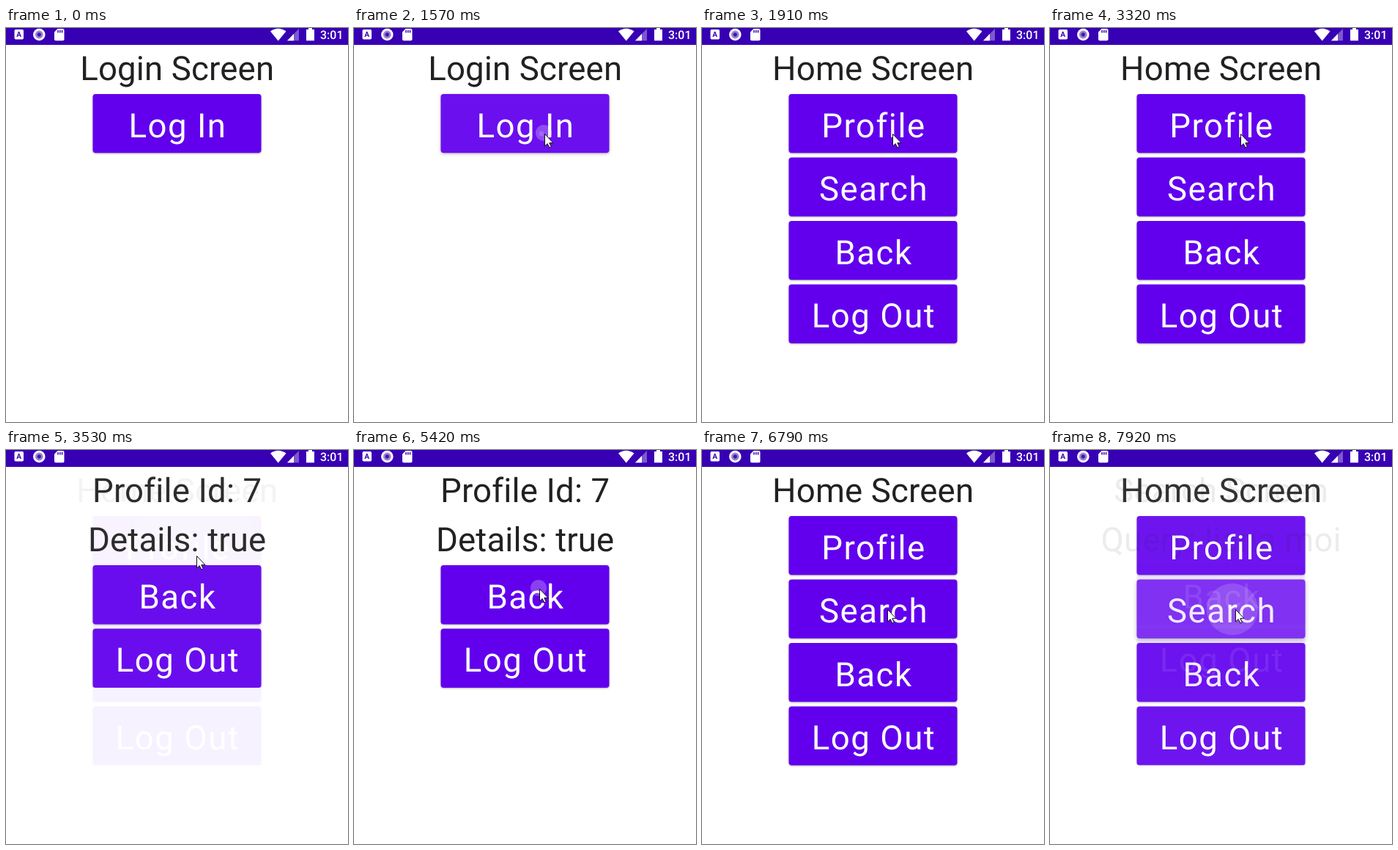
An HTML page that plays this animation: 467 by 537 pixels, repeating every 7.99 s.

```html
<!DOCTYPE html>
<html lang="en">
<head>
<meta charset="utf-8">
<title>Navigation demo</title>
<style>
html, body { margin: 0; width: 100%; height: 100%; overflow: hidden; background: #fff; }
svg { display: block; width: 100vw; height: 100vh; }
text { font-family: Roboto, sans-serif; text-rendering: geometricPrecision; }
.title, .label { font-size: 45.6px; text-anchor: middle; }
.title { fill: #212121; letter-spacing: .15px; }
.label { fill: #fff; letter-spacing: 1.5px; }
</style>
</head>
<body>
<svg id="stage" viewBox="0 0 467 537">
  <defs><clipPath id="clip"><rect id="clipRect" x="118.5" width="230" height="80.4" rx="4"/></clipPath></defs>
  <g id="screens"></g>
  <rect width="467" height="23" fill="#3700b3"/>
  <g fill="#fff">
    <rect x="11.5" y="2" width="12.5" height="13.5" rx="1.8"/>
    <text x="17.7" y="12" font-size="10" font-weight="700" text-anchor="middle" style="fill:#3700b3">A</text>
    <circle cx="45.3" cy="9" r="8.3"/>
    <circle cx="45.3" cy="9" r="4.2" fill="#7c5bc9" stroke="#9b82d8" stroke-width="2.4"/>
    <circle cx="45.3" cy="9" r="2.4" fill="#3d1a9c"/>
    <path d="M70.5 1H77.5q2 0 2 2V15.5q0 1.7-2 1.7H68q-2 0-2-1.7V5.5Z"/>
    <path d="M71 3v3.5M73.8 3v3.5M76.6 3v3.5" stroke="#3700b3" stroke-width="1.5"/>
    <path d="M361 4.5Q371.5-3 382.5 4.5L371.7 17.5Z"/>
    <path d="M400 1V17.2H384Z" opacity=".35"/>
    <path d="M393 8V17.2H384Z"/>
    <path d="M413 0h5v2h3v15.2h-11V2h3Z"/>
    <text x="429" y="15" font-size="16" font-weight="500">3:01</text>
  </g>
  <circle id="dot" r="11" fill="#fff" fill-opacity=".25"/>
  <path id="cursor" d="M.5.5V17L4.2 13.6 6.8 19 9.3 17.9 6.8 12.6H12Z" fill="#fff" stroke="#111"/>
</svg>
<script>
const LOOP = 7990, FADE = 300, STEP = 68;
const $ = id => document.getElementById(id);

function set(el, attrs) {
  for (const key in attrs) el.setAttribute(key, attrs[key]);
}

function add(parent, tag, attrs, text) {
  const el = document.createElementNS('http://www.w3.org/2000/svg', tag);
  set(el, attrs);
  if (text) el.textContent = text;
  return parent.appendChild(el);
}

// Headings are stacked first, then the buttons.
function makeScreen(headings, labels) {
  const root = add($('screens'), 'g');
  headings.forEach((s, i) => add(root, 'text', { class: 'title', x: 233.7, y: 71 + i * 67.2 }, s));
  const buttons = labels.map((s, i) => {
    const y = 22.7 + headings.length * 67.2 + i * 86.5;
    const rect = add(root, 'rect', { x: 118.5, y, width: 230, height: 80.4, rx: 4, fill: '#6200ee' });
    add(root, 'text', { class: 'label', x: 234.5, y: y + 58.6 }, s);
    return { y, rect };
  });
  return { root, buttons };
}

const login = makeScreen(['Login Screen'], ['Log In']);
const home = makeScreen(['Home Screen'], ['Profile', 'Search', 'Back', 'Log Out']);
const profile = makeScreen(['Profile Id: 7', 'Details: true'], ['Back', 'Log Out']);
const search = makeScreen(['Search Screen', 'Query: liana moi'], ['Back', 'Log Out']);

// down: finger touches; react: button responds; fade: crossfade begins; tick: phase of the stepped clock
const taps = [
  { from: login, to: home, button: 0, down: 1370, react: 1510, fade: 1600, tick: 1570 },
  { from: home, to: profile, button: 0, down: 3050, react: 3250, fade: 3312, tick: 3530 },
  { from: profile, to: home, button: 0, down: 5420, react: 5560, fade: 5635, tick: 5750 },
  { from: home, to: search, button: 1, down: 7650, react: 7780, fade: 7871, tick: 7920 }
];

const smooth = u => u * u * (3 - 2 * u);
const moves = [
  { start: 130, end: 1110, steps: 15, from: [415, 499], to: [260, 144], ease: u => 1 - (1 - u) ** 2.76 },
  { start: 4000, end: 4560, steps: 9, from: [260, 144], to: [253, 189], ease: smooth },
  { start: 6360, end: 6790, steps: 7, from: [253, 189], to: [253, 217], ease: smooth }
];

const clamp = (v, lo = 0, hi = 1) => Math.min(hi, Math.max(lo, v));

// cubic-bezier(.4, 0, .2, 1)
function fastOutSlowIn(x) {
  let lo = 0, hi = 1;
  for (let i = 0; i < 20; i++) {
    const s = (lo + hi) / 2, r = 1 - s;
    if (1.2 * s * r * r + .6 * s * s * r + s ** 3 < x) lo = s; else hi = s;
  }
  return x >= 1 ? 1 : smooth(lo);
}

function cursorAt(t) {
  const m = moves.filter(m => t >= m.start).pop();
  if (!m) return null;
  const k = Math.floor((t - m.start) / (m.end - m.start) * (m.steps - 1) + 1e-6);
  const u = m === moves[0] ? k / (m.steps - 1) : (k + 1) / m.steps;
  const p = m.ease(clamp(u));
  return m.from.map((a, i) => Math.round(a + (m.to[i] - a) * p));
}

const overlay = add($('stage'), 'g', { 'clip-path': 'url(#clip)', fill: '#fff' });
const tint = add(overlay, 'rect', { x: 118.5, width: 230, height: 80.4 });
const ripple = add(overlay, 'circle', { 'fill-opacity': .17 });

function draw(t) {
  const pos = cursorAt(t);
  const tap = taps.filter(p => t >= p.down).pop();
  const q = tap ? tap.tick + Math.floor((t - tap.tick) / STEP) * STEP : 0;
  const mix = tap ? fastOutSlowIn(clamp((q - tap.fade) / FADE)) : 0;
  const active = tap && mix < 1;
  const age = active ? Math.max(0, q - tap.react) : 0;

  for (const screen of [login, home, profile, search]) {
    const shown = !tap ? +(screen === login) : screen === tap.to ? mix : screen === tap.from ? 1 - mix : 0;
    screen.root.style.opacity = shown;
    screen.root.style.display = shown ? '' : 'none';
    // A translucent layer cuts off shadows at its bounds.
    screen.root.style.clipPath = shown < 1 ? 'inset(0)' : 'none';
    screen.buttons.forEach((b, i) => {
      const lift = active && screen === tap.from && i === tap.button ? clamp(age / 100) : 0;
      b.rect.style.filter = `drop-shadow(0 ${1 + lift}px ${1 + 2 * lift}px rgba(0,0,0,.3))`;
    });
  }

  overlay.style.display = age ? '' : 'none';
  if (age) {
    const { root, buttons } = tap.from;
    const { y } = buttons[tap.button];
    $('screens').append(root, tap.to.root);
    root.append(overlay);
    set($('clipRect'), { y });
    set(tint, { y, 'fill-opacity': Math.min(.14, age * .001) });
    set(ripple, { cx: pos[0] - 4, cy: pos[1], r: Math.max(0, .4 * (age - 52)) });
  }

  $('cursor').style.display = pos ? '' : 'none';
  if (pos) $('cursor').setAttribute('transform', `translate(${pos})`);
  const touching = active && t < tap.react + 65;
  $('dot').style.display = touching ? '' : 'none';
  if (touching) set($('dot'), { cx: pos[0] - 1, cy: pos[1] - 1 });
}

const began = performance.now();
function tick() {
  draw((performance.now() - began) % LOOP);
  requestAnimationFrame(tick);
}
tick();
</script>
</body>
</html>
```
